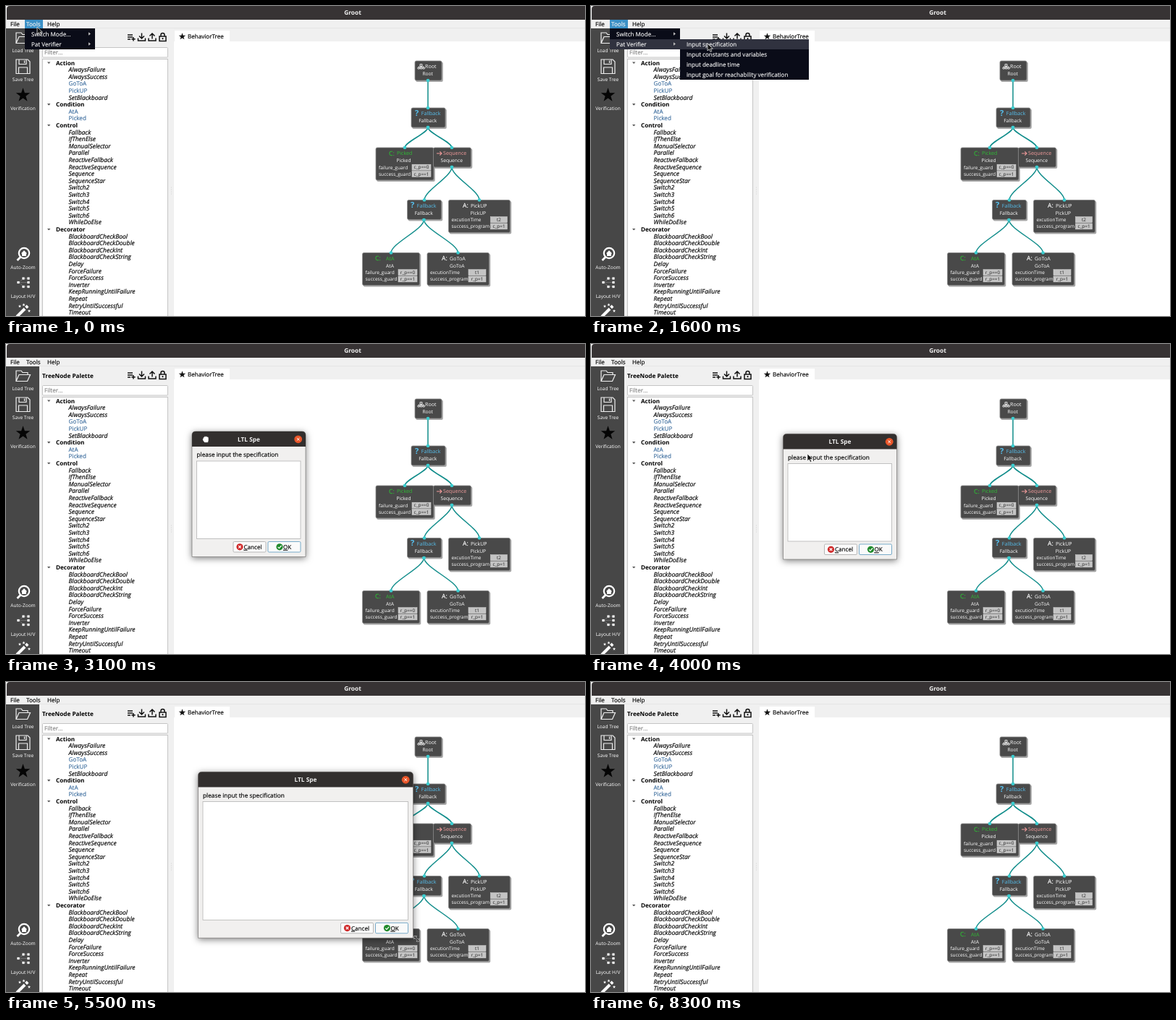
Write an HTML page that moves like this. It is 800 px wide and 429 px high and loops after 8.4 s.

```html
<!DOCTYPE html>
<html lang="en">
<head>
<meta charset="utf-8">
<title>Groot</title>
<style>
html, body { margin: 0; width: 100%; height: 100%; overflow: hidden; background: #fff; }
svg { display: block; width: 100vw; height: 100vh; }
text { font-family: "Open Sans", "Noto Sans", sans-serif; font-size: 8.1px; fill: var(--c, #000); stroke: var(--c, #000); stroke-width: .16px; white-space: pre; text-rendering: geometricPrecision; }
.b { font-weight: 700; stroke: none; }
.i { font-style: italic; }
.m { text-anchor: middle; }
.w { --c: #f2f2f2; }
.blue { --c: #3f6f9f; }
.side { font-size: 6.6px; --c: #fff; text-anchor: middle; stroke: none; }
.head { font-size: 7.1px; stroke: none; }
.name { font-size: 6.7px; --c: #fff; text-anchor: middle; stroke: none; }
.row { font-size: 6.55px; --c: #fff; stroke: none; }
.val { font-size: 6.4px; --c: #222; text-anchor: middle; stroke: none; }
.u { text-decoration: underline; text-decoration-thickness: .6px; }
.line { fill: none; stroke: #111; stroke-width: 1.5; }
</style>
</head>
<body>
<svg id="stage" viewBox="0 0 800 429"></svg>
<script>
const LOOP = 8400, STEP = 100;
const stage = document.getElementById('stage');

const rect = (x, y, w, h, fill, more = '') =>
  `<rect x="${x}" y="${y}" width="${w}" height="${h}" fill="${fill}" ${more}/>`;
const text = (x, y, s, cls = '', more = '') =>
  `<text x="${x}" y="${y}" class="${cls}" ${more}>${s}</text>`;
const path = (d, fill = 'none', more = '') => `<path d="${d}" fill="${fill}" ${more}/>`;
const circle = (x, y, r, fill, more = '') => `<circle cx="${x}" cy="${y}" r="${r}" fill="${fill}" ${more}/>`;
const stroke = (c, w) => `stroke="${c}" stroke-width="${w}"`;

function star(cx, cy, r, fill) {
  let pts = '';
  for (let k = 0; k < 10; k++) {
    const a = k * Math.PI / 5, q = k % 2 ? r * 0.4 : r;
    pts += `${cx + q * Math.sin(a)},${cy - q * Math.cos(a)} `;
  }
  return `<polygon points="${pts}" fill="${fill}"/>`;
}

function frame() {
  return rect(0, 0, 800, 429, '#fff') +
    rect(0, 19, 800, 30, '#f0f0f0') +
    path('M1 19V4Q1 0 5 0H800V19Z', '#373334') +
    text(479, 12.2, 'Groot', 'b m w', 'style="font-size:8.4px"') +
    rect(0, 30.5, 800, .6, '#dcdcdc') +
    text(6, 28, 'File') + text(28, 28, 'Tools') + text(57, 28, 'Help') +
    rect(233, 34, 76, 16, '#fff') + star(243.5, 42.3, 5, '#111') + text(251, 45.3, 'BehaviorTree');
}

function sidebar() {
  const white = stroke('#eee', 1.2);
  let s = rect(0, 31, 46, 398, '#474747');
  s += path('M14 51V37H21L23 39.5H30V42.5M14 51.5L18 42.5H33.5L29.5 51.5Z', 'none', white);
  s += path('M14 74H30L33 77V93.5H14Z', 'none', white) +
    path('M18 74V80.5H28V74M17.5 93V85H29.5V93M25.5 75.5V79', 'none', white);
  s += star(23.5, 123.5, 10.2, '#050505');
  s += circle(25, 342, 7.2, 'none', stroke('#fff', 2.2)) +
    path('M20 347.5L15.5 352', 'none', stroke('#fff', 2.8)) +
    path('M20.8 342.5L25 338.3L29.2 342.5H28V346H22V342.5Z', '#fff');
  s += path('M18 382.5L24 377M18 382.5L24 388M24 377H31M24 388H31M18 382.5H30', 'none', stroke('#aaa', .7) + ' stroke-dasharray="1.2 1"');
  for (const [x, y] of [[17, 382.5], [24, 377], [24, 388.5], [31, 377], [31, 382.5], [31, 388.5]])
    s += rect(x - 1.6, y - 1.6, 3.2, 3.2, '#fff');
  s += path('M15 430L26 419', 'none', stroke('#fff', 4)) + path('M27.5 417.5L30 415', 'none', stroke('#fff', 4));
  for (const [x, y] of [[19, 415.5], [24.5, 413.5], [32, 422]]) s += star(x, y, 2.3, '#fff');
  const labels = [['Load Tree', 64.2], ['Save Tree', 103.6], ['Verification', 143.6], ['Auto-Zoom', 364.2], ['Layout H/V', 404.2]];
  return s + labels.map(([t, y]) => text(23.5, y, t, 'side')).join('');
}

const groups = {
  Action: 'AlwaysFailure AlwaysSuccess GoToA* PickUP* SetBlackboard',
  Condition: 'AtA* Picked*',
  Control: 'Fallback IfThenElse ManualSelector Parallel ReactiveFallback ReactiveSequence Sequence SequenceStar Switch2 Switch3 Switch4 Switch5 Switch6 WhileDoElse',
  Decorator: 'BlackboardCheckBool BlackboardCheckDouble BlackboardCheckInt BlackboardCheckString Delay ForceFailure ForceSuccess Inverter KeepRunningUntilFailure Repeat RetryUntilSuccessful Timeout'
};

function palette() {
  let s = rect(46, 31, 186, 398, '#f0f0f0') + text(50, 47, 'TreeNode Palette', 'b', 'style="font-size:8.2px"');
  s += '<g class="line" transform="translate(0 -.5)">' + path('M168 40.5H175M168 43.5H175M168 46.5H172M176 43.5V49M173.3 46.3H178.7') +
    path('M187.5 38V45M184 42L187.5 45.5L191 42M182.5 45V48.5H192.5V45') +
    path('M202 46V39M198.5 42L202 38.5L205.5 42M197 45V48.5H207V45') +
    path('M212 42.5H221V49H212ZM214 42V40.5Q214 38 216.5 38T219 40.5V42') + '</g>' +
    circle(216.5, 45.2, 1.1, '#111');
  s += rect(50.5, 57.5, 173, 13.5, '#fff', stroke('#b8b8b8', .8) + ' rx="1"') +
    text(53, 67, 'Filter...', '', 'style="--c:#888"') +
    rect(50.5, 73.5, 173, 360, '#fff', stroke('#b8b8b8', .8));
  let n = 0;
  const y = () => 81.5 + 9.604 * n++;
  for (const [title, items] of Object.entries(groups)) {
    const gy = y();
    s += path(`M57 ${gy - 4}H61.4L59.2 ${gy - 1.4}Z`, '#555') + text(69, gy, title, 'b');
    for (const it of items.split(' ')) {
      const own = it.endsWith('*');
      s += text(86.5, y(), it.replace('*', ''), own ? 'blue' : 'i', own ? '' : 'style="font-size:8.5px"');
    }
  }
  for (let k = 0; k < 4; k++) s += circle(228.5, 251 + 3 * k, .5, '#ccc');
  return s;
}

// kind, label, x, y, width, header x, parameter rows, value box x and width
const nodes = [
  ['root', 'Root', 565, 76, 37, 569],
  ['fall', 'Fallback', 560, 141, 47, 565],
  ['C', 'Picked', 511, 196, 80, 529, ['failure_guard', 'c_p==0', 'success_guard', 'c_p==1'], 561, 26],
  ['seq', 'Sequence', 590.5, 196, 52, 595],
  ['fall', 'Fallback', 554.5, 268.5, 47, 559],
  ['A', 'PickUP', 611.5, 268.5, 85, 631, ['excutionTime', 't2', 'success_program', 'c_p=1'], 669.5, 23],
  ['C', 'AtA', 492.5, 341.5, 79, 510, ['failure_guard', 'r_p==0', 'success_guard', 'r_p==1'], 542, 26],
  ['A', 'GoToA', 582, 341.5, 85.5, 602, ['excutionTime', 't1', 'success_program', 'r_p=1'], 639, 24]
];
const links = [[583, 103, 583, 141], [583, 168, 551, 196], [583, 168, 616, 196], [616, 223, 578, 268.5],
  [616, 223, 654, 268.5], [577.5, 296, 532, 341.5], [577.5, 296, 624.5, 341.5]];
const tint = { root: '#fff', fall: '#56c0ee', seq: '#f09a9a', C: '#2fbb35', A: '#fff' };

function node([kind, label, x, y, w, hx, rows, vx, vw]) {
  const c = tint[kind], h = rows ? 45 : 27, base = y + 10.4;
  let s = rect(x + 1.2, y + 1.5, w + .6, h + .6, '#777', 'rx="2" opacity=".65"') +
    rect(x, y, w, h, '#494949', stroke('#8a8a8a', .8) + ' rx="2"');
  if (kind === 'root')
    s += path(`M${hx + 3} ${y + 4.5}h3v2.6h-3zM${hx} ${y + 9}h2.4v2h-2.4zM${hx + 3.4} ${y + 9}h2.4v2h-2.4zM${hx + 6.8} ${y + 9}h2.4v2h-2.4zM${hx + 4.5} ${y + 7}v2M${hx + 1.2} ${y + 9}v-1h6.8v1`, 'none', stroke(c, .8));
  else if (kind === 'seq')
    s += path(`M${hx} ${y + 8}h7m-2.6 -2.6l2.6 2.6l-2.6 2.6`, 'none', stroke(c, 1.1));
  else
    s += text(hx, base + .4, kind === 'fall' ? '?' : kind + ':', kind === 'fall' ? 'b' : '',
      `style="--c:${c};font-size:${kind === 'fall' ? 11 : 8.6}px"`);
  const gap = { root: 10, fall: 8.8, seq: 9, C: label === 'AtA' ? 15 : 11, A: 11 }[kind];
  s += text(hx + gap, base, label, 'head', `style="--c:${c}"`);
  s += text(rows ? x + w / 2 - 1.5 : x + w / 2 - .8, y + 20, label, 'name');
  if (rows) for (const k of [0, 1]) {
    const by = y + 29.6 + 9.2 * k;
    s += text(x + 4, by, rows[2 * k], 'row') +
      rect(vx, by - 6.4, vw, 8, '#c4c4c4', stroke('#ddd', .5)) +
      text(vx + vw / 2, by - .2, rows[2 * k + 1], 'val');
  }
  return s;
}

function link([a, b, c, d]) {
  const bend = (d - b) * .28;
  return path(`M${a} ${b}C${a} ${b + bend} ${c} ${d - bend} ${c} ${d}`, 'none', stroke('#0f8c8a', 1.5));
}

function tree() {
  let s = links.map(link).join('') + nodes.map(node).join('');
  for (const [a, b, c, d] of links) s += circle(a, b, 2.3, '#3bcdd0') + circle(c, d, 2.3, '#3bcdd0');
  return s;
}

const chevron = y => path(`M114 ${y - 2.2}L117 ${y}L114 ${y + 2.2}Z`, '#bbb');

function menus() {
  const entries = ['Input specification', 'Input constants and variables', 'input deadline time', 'input goal for reachability verification'];
  return '<g id="menu">' + rect(26, 19, 25, 12, '#3b90c6') + text(28, 28, 'Tools', 'w') +
    rect(26, 31, 97, 29, '#0a0c18') + '<g id="pick">' + rect(26, 46, 97, 14, '#30323f') + '</g>' +
    text(35, 42, 'Switch Mode...', 'w') + text(35, 56, 'Pat Verifier', 'w') + chevron(38.5) + chevron(52.5) +
    '</g><g id="sub">' + rect(123, 46, 178, 56, '#0a0c18') +
    '<g id="hot">' + rect(123, 46, 178, 14, '#30323f') + '</g>' +
    entries.map((e, k) => text(132, 56 + 14 * k, e, 'w')).join('') + '</g>';
}

const lines = ['#assert BehaviorTree |= G( AtA_f -&gt; F (GoToA_s || GoToA_f || GoToA_r))',
  '#define goal c_p==1;', '#assert DeadlineProcess  reaches goal;'];

const cross = (x, y, r, w) =>
  path(`M${x - r} ${y - r}L${x + r} ${y + r}M${x + r} ${y - r}L${x - r} ${y + r}`, 'none', stroke('#fff', w));

function button(x, y, label, icon, border) {
  return rect(x, y, 45, 14.5, '#fafafa', stroke(border, .9) + ' rx="1.5"') + icon +
    text(x + (label === 'OK' ? 21 : 14.5), y + 10.4, `<tspan class="u">${label[0]}</tspan>${label.slice(1)}`);
}

function dialog(w, h) {
  const by = h - 21, iy = by + 7.3;
  return path(`M0 ${h}V5Q0 0 5 0H${w - 5}Q${w} 0 ${w} 5V${h}Z`, '#f1f0ef', stroke('#6b6967', .6)) +
    path(`M0 21V5Q0 0 5 0H${w - 5}Q${w} 0 ${w} 5V21Z`, '#322f2e') +
    text(w / 2, 13.9, 'LTL Spe', 'b m w', 'style="font-size:8.3px"') +
    circle(w - 10.3, 10.8, 5.4, '#e9562a') + cross(w - 10.3, 10.8, 1.8, 1) +
    text(6.5, 35, 'please input the specification', '', 'style="font-size:8.3px"') +
    rect(6.5, 41, w - 13.5, h - 66, '#fff', stroke('#b4b4b4', .8)) +
    button(w - 100, by, 'Cancel', circle(w - 91, iy, 4.6, '#cf2727') + cross(w - 91, iy, 1.8, 1.2), '#b0b0b0') +
    button(w - 52, by, 'OK', circle(w - 36, iy, 4.6, '#208a2c') +
      path(`M${w - 38.4} ${iy}l1.8 1.8l3.2 -3.6`, 'none', stroke('#fff', 1.2)), '#6aa3c4');
}

const cursors = {
  arrow: path('M0 0V10L2.4 7.8L4 11.4L5.8 10.6L4.2 7.1H7.4Z', '#111', stroke('#fff', .7)),
  hand: path('M-3.5 -2Q-3.5 -4 -2 -3.4Q-1.5 -5 0 -4Q1.2 -5 2 -3.6Q4 -4 4 -2V1.5Q4 4 2 4.5H-1.5Q-4.5 2 -4.5 0Z', '#fff', stroke('#222', .6)),
  size: path('M-3.6 -3.6H.2L-1.1 -2.2L2.2 1.1L3.6 -.2V3.6H-.2L1.1 2.2L-2.2 -1.1L-3.6 .2Z', '#111', stroke('#fff', .6))
};

stage.innerHTML = frame() + sidebar() + palette() + tree() + menus() +
  '<g id="dlg"><g id="win" style="filter:drop-shadow(0 2px 5px rgba(0,0,0,.5))"></g><g id="typed">' +
  lines.map((l, k) => text(9.3, 51.2 + 9.5 * k, l, '', 'style="font-size:8.04px"')).join('') +
  '<rect id="caret" y="62.6" width=".8" height="9" fill="#111"/></g></g>' +
  '<g id="ptr">' + Object.entries(cursors).map(([k, v]) => `<g id="${k}">${v}</g>`).join('') + '</g>';

const $ = id => document.getElementById(id);
const show = (id, on) => $(id).setAttribute('display', on ? 'inline' : 'none');
const move = (id, x, y) => $(id).setAttribute('transform', `translate(${x} ${y})`);

// Eased value along [time, a, b] keys
function along(keys, t) {
  let k = 0;
  while (k < keys.length - 2 && t >= keys[k + 1][0]) k++;
  const [p, q] = [keys[k], keys[k + 1]];
  const u = Math.min(1, Math.max(0, (t - p[0]) / (q[0] - p[0])));
  const e = u * u * (3 - 2 * u);
  return [p[1] + (q[1] - p[1]) * e, p[2] + (q[2] - p[2]) * e];
}

const pointer = [[0, 43, 29], [200, 43, 29], [500, 52, 50], [800, 100, 51], [1000, 147, 44.5], [1300, 161, 52],
  [1800, 161, 52], [2500, 441, 197], [2700, 419, 182], [3100, 276, 132], [3300, 284, 135], [3800, 284, 135],
  [4800, 428, 299], [5100, 428, 299], [5700, 616, 375], [6100, 500, 290], [6300, 500, 290], [6700, 580, 360],
  [7400, 580, 360], [8100, 640, 440]];
const place = [[2700, 400, 171], [3100, 257, 121], [3300, 265.5, 124.5]];
const size = [[5100, 157, 173.5], [5700, 346, 249.5]];

function draw(t) {
  show('menu', t < 1700);
  show('pick', t >= 500);
  show('sub', t >= 600 && t < 1700);
  show('hot', t >= 1200);
  const open = t >= 1900 && t < 7300;
  show('dlg', open);
  if (open) {
    move('dlg', ...along(place, t));
    $('win').innerHTML = dialog(...along(size, t));
    show('typed', t >= 6200);
    const last = $('typed').children[2];
    $('caret').setAttribute('x', 9.7 + last.getComputedTextLength());
  }
  const kind = t >= 2700 && t < 3400 ? 'hand' : t >= 4800 && t < 5800 ? 'size' : 'arrow';
  for (const k in cursors) show(k, k === kind);
  move('ptr', ...along(pointer, t));
}

function tick(now) {
  draw(Math.floor(now % LOOP / STEP) * STEP);
  requestAnimationFrame(tick);
}
draw(0);
requestAnimationFrame(tick);
</script>
</body>
</html>
```
